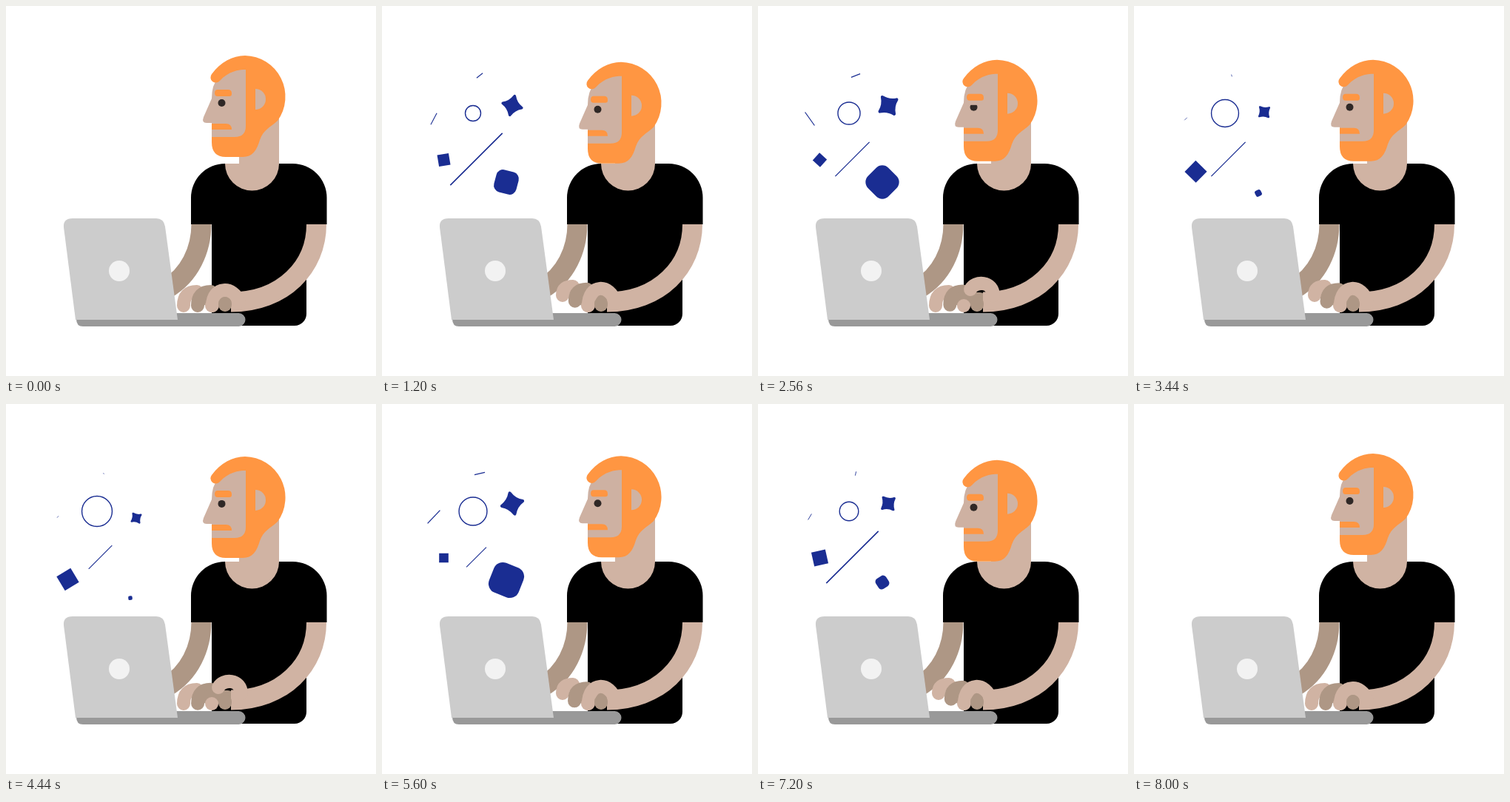
Animation, 500 px wide and 500 px high, one loop 8040 ms. Source, as an HTML page:

```html
<!DOCTYPE html>
<html>
<head>
<meta charset="utf-8">
<style>
html, body { margin: 0; width: 100%; height: 100%; overflow: hidden; background: #fff; }
svg { display: block; width: 100vw; height: 100vh; }
.skin { fill: #d0b3a3; }
.face { fill: #ceb1a2; }
.hair { fill: #ff9642; }
.light, .dark { fill: none; stroke: #d0b3a3; stroke-width: 18; stroke-linecap: round; }
.dark { stroke: #ae9785; }
.arm { stroke-width: 27; stroke-linecap: butt; }
.blue { fill: #1a2d92; }
.line { fill: none; stroke: #1a2d92; }
</style>
</head>
<body>
<svg viewBox="0 0 500 500">
  <circle id="ring" class="line" cx="123"/>
  <path id="dashA" class="line"/>
  <path id="dashB" class="line"/>
  <path id="beam" class="line"/>
  <rect id="square" class="blue" x="-.5" y="-.5" width="1" height="1"/>
  <rect id="pebble" class="blue" x="-.5" y="-.5" width="1" height="1" rx=".3"/>
  <path id="star" class="blue" stroke="#1a2d92" stroke-width=".25" stroke-linejoin="round"
    d="M-.62-.62Q0-.37 .62-.62Q.37 0 .62 .62Q0 .37-.62 .62Q-.37 0-.62-.62Z"/>

  <path class="dark arm" d="M264 294C264 330 248 364 217 382"/>
  <path d="M250 295V259A46 46 0 0 1 296 213H387.500A46 46 0 0 1 433.500 259V295H406V416A16 16 0 0 1 390 432H278V295Z"/>
  <path class="skin" d="M315 150H369V213A36.500 36.500 0 0 1 296 213H315Z"/>

  <g id="head">
    <path class="face" d="M324 84Q303 85 287 97Q278 106 278 125L267 150Q264 158 271 158H278V180H326V84Z"/>
    <path class="hair" d="M324 86C314 86 301 88 289 101A7 7 0 0 1 278 92C290 76 306 67 323 67A55.500 55.500 0 0 1 367 155C357 164 348 167 343 181C339 195 333 204 320 204H297Q278 204 278 184V177H309Q324 177 324 162Z"/>
    <path class="skin" d="M337 112A14 14 0 0 1 337 140Z"/>
    <circle cx="291.5" cy="131" r="5" fill="#2f2826"/>
    <rect id="lid" class="face" x="285" y="125" width="13"/>
    <path class="hair" d="M286 113H300Q305 113 305 118V119Q305 122 302 122H286Q282 122 282 117.500Q282 113 286 113Z"/>
    <path class="hair" d="M278 159H297Q305 159 305 167H278Z"/>
  </g>

  <path fill="#999" d="M95 423H230V415H314.500A9 9 0 0 1 314.500 433H104Q95 433 95 423Z"/>
  <path id="fingerA" class="light"/>
  <path id="fingerB" class="dark"/>
  <path class="dark" d="M272 396H300"/>
  <path class="light" d="M278 405h.1"/>
  <path class="light arm" d="M419.500 295C419.500 352 375 400 304 400"/>
  <path id="hand" class="light"/>
  <path class="dark" d="M296 402V404" stroke-width="20"/>
  <path fill="#ccc" d="M90 287H203Q213 287 215 298L232 424H94L78 299Q77 287 90 287Z"/>
  <circle cx="153" cy="358" r="14" fill="#f2f2f2"/>
</svg>
<script>
const set = (id, attrs) => {
  for (const k in attrs) document.getElementById(id).setAttribute(k, attrs[k]);
};
const { PI, sin, cos, min, max, abs } = Math;
const sin2 = x => sin(PI * x) ** 2;
const bump = (x, mid, half) => abs(x - mid) < half ? cos((x - mid) / half * PI / 2) ** 2 : 0;
const fall = (d, span, power) => max(0, 1 - d / span) ** power;

function place(id, x, y, angle, size) {
  set(id, { transform: `translate(${x} ${y}) rotate(${angle}) scale(${size})` });
}

function dash(id, x, y, angle, length, width) {
  set(id, {
    d: `M${-length / 2} 0H${length / 2}`,
    transform: `translate(${x} ${y}) rotate(${angle})`,
    'stroke-width': length > .2 ? width : 0
  });
}

function finger(id, x, lift) {
  const tip = x + 4 * lift, top = 386 - 7 * lift;
  set(id, { d: `M${tip} ${405 - 14 * lift}C${tip} ${392 - 10 * lift} ${x + 6 + 3 * lift} ${top} ${x + 18} ${top}` });
}

function hand(lift, rise) {
  const top = 378 - 7 * lift - 3 * rise;
  set('hand', { d: `M${279 + 8 * lift} ${405 - 22 * lift}C${279 + 14 * lift} ${top} ${308 + 10 * lift} ${top} ${315 + 3 * lift} ${400 - 8 * lift}` });
}

function draw(t) {
  const beat = t / 2 % 1, cycle = t / 4 % 1;
  const edge = min(cycle, 1 - cycle), ends = min(t, abs(8 - t));
  const reach = sin2(beat), grow = sin2(cycle);

  set('head', { transform: `translate(0 ${9.6 * reach})` });
  set('lid', { height: 11 * bump(t, 2.65, .14) });

  const far = min(1, 1.3 * bump(beat, .7, .35));
  finger('fingerA', 240, far);
  finger('fingerB', 259, .45 * bump(beat, .6, .45));
  hand(min(1, 1.1 * bump(beat, .24, .24)), far);

  // Shapes rise from behind the laptop and sink back
  const hidden = fall(ends, .8, 2);
  set('ring', {
    cy: 145 + 80 * hidden,
    r: (15.2 + 5.3 * cos((t - 4.6) * PI / 4)) * (1 - hidden),
    'stroke-width': 1.4 * (1 - hidden)
  });
  dash('dashA', 70, 152.5, 110 + 45 * t - 50 * cos(2 * PI * (cycle - .36)), 27 * grow, .5 + .9 * grow);
  dash('dashB', 132, 94, 175 * sin(PI * cycle), 16 * grow, .5 + .9 * grow);
  dash('beam', 127.5, 207, -45, 110 * reach, .7 + reach);

  place('square', 83.5, 208 + 96 * fall(edge, .2, 1.5), 104.5 * t - 45, (23.5 - 12 * grow) * min(1, edge / .08));
  place('pebble', 168, 238 + 77 * fall(edge, .25, 2), 22 * t - 11.5, 47.5 * grow);
  place('star', 176, 134.5 + 97 * fall(edge, .2, 2), 96 * t - 146, 17 * grow ** .3);
}

const start = performance.now();
function tick() {
  const ms = (performance.now() - start) % 8040;
  draw(Math.floor(ms / 40) * .04);
  requestAnimationFrame(tick);
}
tick();
</script>
</body>
</html>
```
